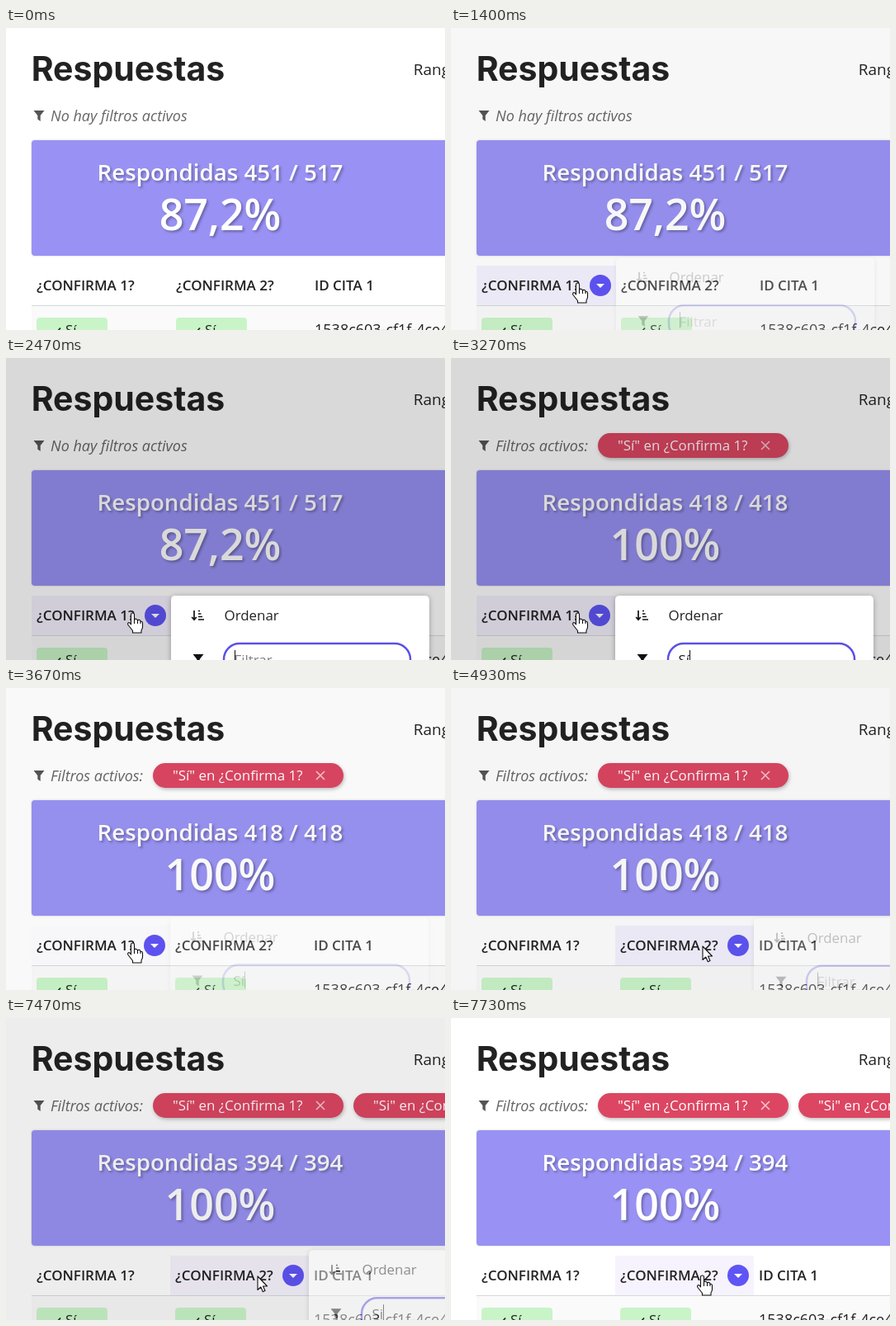
Recreate the animation shown at these times as an HTML page. Size 532 px wide and 366 px high, loop 8 s.

```html
<!DOCTYPE html>
<html lang="es">
<head>
<meta charset="utf-8">
<title>Respuestas</title>
<style>
  html, body { margin: 0; width: 100%; height: 100%; overflow: hidden; background: #fff; }
  svg { display: block; width: 532px; height: 366px; }
  text { font: 16.9px "Open Sans", "Noto Sans", sans-serif; fill: #222; white-space: pre; }
  .title { font: 700 41px Inter, Lato, sans-serif; }
  .range { font-size: 19px; }
  .note { font-size: 18px; font-style: italic; fill: #666; }
  .head { font-size: 17px; font-weight: 600; }
  .big { fill: #fff; font-weight: 600; text-anchor: middle; filter: drop-shadow(2px 2px 1.5px rgba(0,0,0,.3)); }
  .cite { font-size: 18px; }
  .card { filter: drop-shadow(0 0 1px rgba(0,0,0,.2)); }
  .chip { filter: drop-shadow(1px 2px 2px rgba(0,0,0,.25)); }
  .chip text { fill: #fff; }
  .panel { filter: drop-shadow(0 1px 3px rgba(0,0,0,.3)); }
  .line { fill: none; stroke: #222; stroke-width: 1.7; }
</style>
</head>
<body>
<svg viewBox="0 0 532 366">
  <defs>
    <path id="funnel" d="M0 0H13L8.2 6V13L4.8 10.4V6Z"/>
    <g id="tag">
      <rect y="351" width="86" height="30" rx="4" fill="#c9f4c8"/>
      <path class="line" d="M20 367l3 3.5 6-7"/>
      <text x="35" y="371.5">Sí</text>
    </g>
  </defs>
  <rect width="532" height="366" fill="#fff"/>
  <text class="title" x="30.7" y="64">Respuestas</text>
  <text class="range" x="493.7" y="56.5">Rango</text>
  <use href="#funnel" x="33.5" y="100" fill="#555"/>
  <text class="note" id="note" x="54" y="113"></text>
  <g class="chip" id="chip1"></g>
  <g class="chip" id="chip2"></g>

  <rect class="card" x="31" y="136" width="520" height="140" rx="4" fill="#9992f4"/>
  <text class="big" id="count" x="259.5" y="185" style="font-size:27.7px"></text>
  <text class="big" id="percent" x="259.5" y="245" style="font-size:52px"></text>

  <rect x="31" y="337" width="501" height="29" fill="#fafafa"/>
  <rect id="cell" y="288" height="48" fill="#f4f1fe"/>
  <rect x="31" y="336" width="501" height="1" fill="#d3dada"/>
  <text class="head" x="37" y="318">¿CONFIRMA 1?</text>
  <use href="#tag" x="37"/>
  <g id="cols">
    <text class="head" x="206" y="318">¿CONFIRMA 2?</text>
    <use href="#tag" x="206"/>
    <text class="head" x="374" y="318">ID CITA 1</text>
    <text class="cite" x="374" y="372">1538c603-cf1f-4ce4-a2</text>
  </g>
  <g id="button">
    <circle r="13" fill="#5f54f5"/>
    <path d="M-5 -2H5L0 3Z" fill="#fff"/>
  </g>

  <rect id="shade" width="532" height="366"/>

  <g id="menu">
    <rect class="panel" y="288" width="313" height="130" rx="5" fill="#fff"/>
    <path class="line" style="stroke:#111" d="M28 306V317M25.2 314L28 317.2 30.8 314M33 306.5H35M33 310H36.5M33 313.5H38M33 317H40"/>
    <text x="64.5" y="318">Ordenar</text>
    <use href="#funnel" x="26.5" y="359" fill="#111"/>
    <rect x="64" y="346" width="226" height="42" rx="19" fill="#fff" stroke="#5b50e6" stroke-width="2.5"/>
    <text id="field" x="76.5" y="371.5"></text>
    <rect id="caret" y="354" width="1" height="20" fill="#111"/>
  </g>

  <g id="mouse" stroke="#111" stroke-width="1.1" stroke-linejoin="round">
    <path id="arrow" fill="#fff" d="M0 0V16.5L3.8 13 6.3 18.7 9 17.5 6.5 12H11.5Z"/>
    <g id="hand" transform="translate(-.5 -1)">
      <path fill="#fff" d="M-2 2Q-2 0 0 0T2 2V8Q2.5 7 4 7.2T6 9Q7 8 8.3 8.6T9.5 10.3Q12 10 12 12.5V17Q12 19 10.5 21V24H0V21.5L-5.5 14.5Q-6.5 12.5-5 11.8T-2 14Z"/>
      <path fill="none" d="M2 8V13M6 9V13M9.5 10V13"/>
    </g>
  </g>
</svg>
<script>
const LOOP = 8000, TICK = 1000 / 15;
const el = {};
document.querySelectorAll('svg [id]').forEach(n => el[n.id] = n);

const set = (n, attrs) => { for (const a in attrs) n.setAttribute(a, attrs[a]); };
const move = (n, x, y) => set(n, { transform: `translate(${x} ${y})` });
const show = (n, on) => { n.style.display = on ? '' : 'none'; };
const write = (n, s) => { if (n.textContent !== s) n.textContent = s; };
const clamp = v => Math.max(0, Math.min(1, v));
const smooth = u => u * u * (3 - 2 * u);

for (const g of [el.chip1, el.chip2]) {
  g.innerHTML = '<rect y="91" height="30" rx="15" fill="#dc4662"/><text x="24" y="112"></text>' +
    '<path fill="none" stroke="#f6c3cc" stroke-width="1.6" d="M-5 101l10 10M5 101l-10 10"/>';
}

function chip(g, x, value, label) {
  show(g, value);
  const w = value.length > 1 ? 231 : 226.7;
  move(g, x, 0);
  set(g.children[0], { width: w });
  write(g.children[1], `"${value}" en ${label}`);
  move(g.children[2], w - 28, 0);
}

// Menu visibility 0..1: even fade in, quicker eased fade out
function menuLevel(k, open, steps, close) {
  if (k < open || k >= close + 4) return 0;
  if (k >= close) return Math.pow(1 - (k - close + 1) / 5, 3.5);
  return clamp((k - open + 1) / steps);
}

function mouseAt(k) {
  if (k <= 14) {
    const u = smooth(clamp((k - 1) / 13));
    return [512 - 369 * u, 357 - 47 * u];
  }
  if (k < 18) return [[147, 153, 157][k - 15], 310];
  const u = clamp((k - 64) / 6);
  return [154 + 151 * smooth(u), 310 + 3 * u + 5.5 * Math.sin(Math.PI * u)];
}

function draw(time) {
  const k = Math.floor((time % LOOP + 4) / TICK);
  const second = k >= 60;
  const shift = k >= 49 ? -1 : 0;
  const value1 = k >= 49 ? 'Sí' : k >= 45 ? 'S' : '';
  const value2 = k >= 105 ? 'Si' : k >= 98 ? 'S' : '';

  write(el.note, value1 ? 'Filtros activos:' : 'No hay filtros activos');
  chip(el.chip1, 178, value1, '¿Confirma 1?');
  chip(el.chip2, 421, value2, '¿Confirma 2?');
  const n = value2 ? 394 : 418;
  write(el.count, 'Respondidas ' + (value1 ? `${n} / ${n}` : '451 / 517'));
  write(el.percent, value1 ? '100%' : '87,2%');
  move(el.cols, shift, 0);

  const level = second ? menuLevel(k, 74, 4, 112) : menuLevel(k, 21, 5, 54);
  const edge = 200 + shift;
  const left = second ? edge : 31;
  const right = second ? 367 : edge;
  let tint = 0;
  if (k >= 74) tint = k >= 112 ? Math.max(level, .8) : 1;
  else if (k >= 21) tint = k >= 54 ? level : 1;
  set(el.cell, { x: left, width: right - left, opacity: tint });

  const [x, y] = mouseAt(k);
  const overHead = y < 336 && x < 368;
  show(el.button, k >= 2 && overHead);
  move(el.button, (x < edge ? 181 : 349) + shift, 312);

  set(el.shade, { opacity: .15 * level });
  show(el.menu, level > 0);
  set(el.menu, { opacity: level });
  move(el.menu, right, -12.5 * (1 - level));

  const typed = second ? value2 : k >= 49 ? 'Sí' : k >= 43 ? 'S' : '';
  write(el.field, typed || 'Filtrar');
  el.field.style.fill = typed ? '#222' : '#808080';
  const since = k - (second ? (k >= 105 ? 105 : k >= 98 ? 98 : 74) : k >= 49 ? 49 : k >= 43 ? 43 : 21);
  show(el.caret, since % 16 < 8);
  set(el.caret, { x: 77 + [0, 9, 13][typed.length] });

  const hand = overHead && !(k >= 74 && k < 113);
  show(el.mouse, k >= 2);
  show(el.hand, hand);
  show(el.arrow, !hand);
  move(el.mouse, x, y);
}

function loop() {
  draw(performance.now());
  requestAnimationFrame(loop);
}
loop();
</script>
</body>
</html>
```
